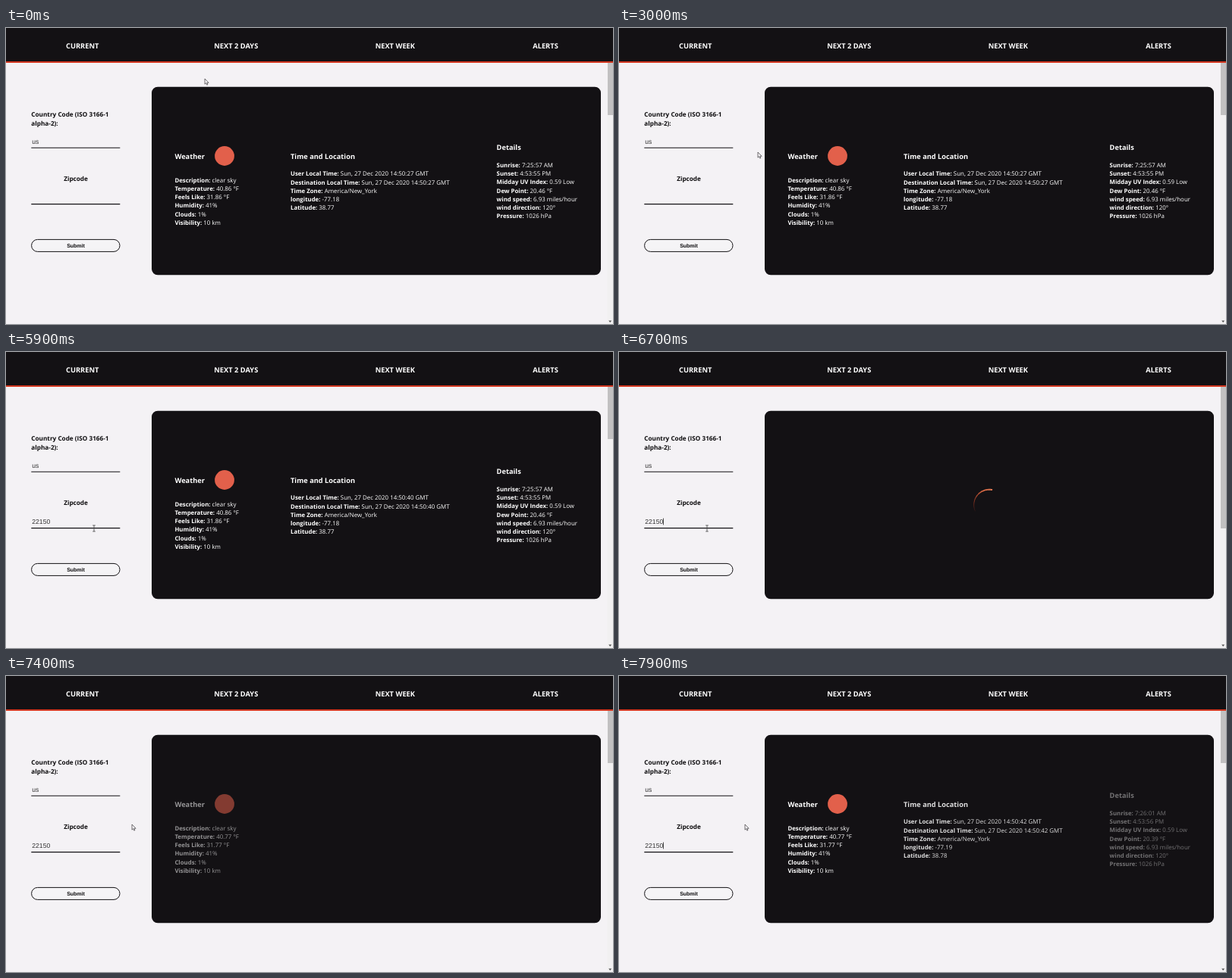
Recreate the animation shown at these times as an HTML page. Size 800 px wide and 391 px high, loop 8000 ms.

```html
<!DOCTYPE html>
<html lang="en">
<head>
<meta charset="utf-8">
<title>Weather dashboard</title>
<style>
html, body { margin: 0; width: 100%; height: 100%; overflow: hidden; background: #f4f2f5; }
svg { display: block; width: 100vw; height: 100vh; font-family: "Open Sans", "Noto Sans", sans-serif; text-rendering: geometricPrecision; }
.nav { font-size: 9.3px; font-weight: 700; fill: #fff; text-anchor: middle; }
.label { font-size: 8.2px; font-weight: 700; fill: #0c0b0d; }
.input { font: 8.6px "Liberation Sans", Arial, sans-serif; fill: #333; }
.submit { font: 700 7px "Liberation Sans", Arial, sans-serif; fill: #0c0b0d; text-anchor: middle; }
.card { font-size: 7.92px; fill: #fff; }
.card .title { font-size: 9.25px; font-weight: 700; }
.card .key { font-size: 7.82px; font-weight: 700; }
</style>
</head>
<body>
<svg viewBox="0 0 800 391">
  <rect width="800" height="391" fill="#f4f2f5"/>
  <rect x="792.5" y="46" width="7.5" height="345" fill="#f1f0f1"/>
  <rect id="thumb" x="793" y="45" width="7" height="70" fill="#c1c0c1"/>
  <path d="M794.2 386.5h4l-2 2.4z" fill="#505050"/>
  <rect width="800" height="44" fill="#131114"/>
  <rect y="44" width="800" height="2" fill="#d2361f"/>
  <g class="nav">
    <text x="100.7" y="27.3">CURRENT</text>
    <text x="303.3" y="27.3">NEXT 2 DAYS</text>
    <text x="512.8" y="27.3">NEXT WEEK</text>
    <text x="711" y="27.3">ALERTS</text>
  </g>

  <g class="label">
    <text x="33.3" y="117.4">Country Code (ISO 3166-1</text>
    <text x="33.3" y="128.7">alpha-2):</text>
    <text x="92" y="202.3" text-anchor="middle">Zipcode</text>
  </g>
  <text class="input" x="34.3" y="153">us</text>
  <text class="input" id="zip" x="34.3" y="227"></text>
  <path d="M33.3 158.3h117M33.3 232.6h117" stroke="#131114" stroke-width="1.1"/>
  <rect id="caret" y="219.6" width=".8" height="8.8" fill="#222"/>
  <rect x="33.6" y="279.4" width="116.4" height="16" rx="8" fill="#f5f4f6" stroke="#131114" stroke-width="1"/>
  <text class="submit" x="92" y="289.6">Submit</text>

  <rect x="192" y="77.7" width="592" height="248.6" rx="8" fill="#131114"/>
  <g class="card" id="card"></g>
  <g id="spinner" fill="none"></g>

  <path id="arrow" d="M0 0V7.2L1.7 5.7 2.8 8.2 3.9 7.7 2.9 5.3H5.1Z" fill="#f4f2f5" stroke="#3a383c" stroke-width=".7"/>
  <path id="ibeam" d="M-1.8 0H1.8M0 0V8M-1.8 8H1.8" fill="none" stroke="#444" stroke-width=".8"/>
</svg>
<script>
const LOOP = 8000, TICK = 100;
const LOAD_START = 6100, LOAD_END = 7000;
const FADE = 500, FADE_STARTS = [7130, 7470, 7700];
const DIGIT = 4.78;

const $ = id => document.getElementById(id);
const show = (el, on) => el.setAttribute('visibility', on ? 'visible' : 'hidden');
const clamp = v => Math.max(0, Math.min(1, v));
const within = (t, spans) => spans.some(([a, b]) => t >= a && t < b);
const latest = (t, steps) => steps.reduce((value, [at, next]) => t >= at ? next : value, '');

// time, x, y
const cursorPath = [
  [0, 262, 67], [100, 262, 67], [500, 281.5, 62], [800, 281.5, 62], [900, 288, 62],
  [1000, 288, 62], [1100, 324, 47], [2400, 324, 47], [3000, 183, 164],
  [3300, 116, 230], [3400, 116, 229], [6900, 116, 229], [7300, 166, 196], [LOOP, 166, 196]
];
const zipSteps = [[4400, '2'], [4600, '22'], [5000, '2215'], [5400, '22150']];
const caretSpans = [[3600, 4000], [4400, 5900], [6400, 6900], [7500, LOOP]];
const clockSteps = [[0, '27'], [4400, '39'], [5000, '40'], [LOAD_START, '42']];

function cursorAt(t) {
  const i = cursorPath.findIndex(p => p[0] > t);
  const [t0, x0, y0] = cursorPath[i - 1], [t1, x1, y1] = cursorPath[i];
  const k = (t - t0) / (t1 - t0);
  return [x0 + (x1 - x0) * k, y0 + (y1 - y0) * k];
}

function column(x, y, title, rows, opacity) {
  const lines = rows.map(([key, value], i) =>
    `<text x="${x}" y="${y + 31.3 + i * 11.2}"><tspan class="key">${key}:</tspan> ${value}</text>`);
  return `<g opacity="${opacity}"><text class="title" x="${x}" y="${y}">${title}</text>${lines.join('')}` +
    (title === 'Weather' ? '<circle cx="288" cy="169" r="12.9" fill="#e2604b"/>' : '') + '</g>';
}

function card(t) {
  const fresh = t >= LOAD_START;
  const pick = (before, after) => fresh ? after : before;
  const opacity = i => fresh ? clamp((t - FADE_STARTS[i]) / FADE) : 1;
  const now = `Sun, 27 Dec 2020 14:50:${latest(t, clockSteps)} GMT`;
  return column(222.4, 172.5, 'Weather', [
    ['Description', 'clear sky'],
    ['Temperature', pick('40.86', '40.77') + ' °F'],
    ['Feels Like', pick('31.86', '31.77') + ' °F'],
    ['Humidity', '41%'],
    ['Clouds', '1%'],
    ['Visibility', '10 km']
  ], opacity(0)) + column(375, 172.5, 'Time and Location', [
    ['User Local Time', now],
    ['Destination Local Time', now],
    ['Time Zone', 'America/New_York'],
    ['longitude', pick('-77.18', '-77.19')],
    ['Latitude', pick('38.77', '38.78')]
  ], opacity(1)).replace(/y="([\d.]+)"><tspan/g, (m, y) => `y="${y - 8.5}"><tspan`) +
  column(646.6, 161.2, 'Details', [
    ['Sunrise', pick('7:25:57', '7:26:01') + ' AM'],
    ['Sunset', pick('4:53:55', '4:53:56') + ' PM'],
    ['Midday UV Index', '0.59 Low'],
    ['Dew Point', pick('20.46', '20.39') + ' °F'],
    ['wind speed', '6.93 miles/hour'],
    ['wind direction', '120°'],
    ['Pressure', '1026 hPa']
  ], opacity(2)).replace(/y="([\d.]+)"><tspan/g, (m, y) => `y="${y - 8.5}"><tspan`);
}

// A tapered arc whose head sits at angle 0
function buildSpinner() {
  const parts = 20, span = 125, r = 20.3;
  const point = deg => {
    const a = deg * Math.PI / 180;
    return `${r * Math.cos(a)} ${r * Math.sin(a)}`;
  };
  let out = '';
  for (let i = 0; i < parts; i++) {
    const k = (i + 1) / parts, from = -span * (1 - i / parts);
    out += `<path d="M${point(from)}A${r} ${r} 0 0 1 ${point(from + span / parts + .4)}"
      stroke="hsl(${10 + 6 * k} 75% ${50 + 12 * k}%)" stroke-width="${.5 + 1.5 * k}" opacity="${Math.min(1, .15 + k * 1.1)}"/>`;
  }
  $('spinner').innerHTML = out;
}

function render(t) {
  const loading = t >= LOAD_START && t < LOAD_END;
  $('card').innerHTML = card(t);
  $('thumb').setAttribute('height', loading ? 188 : 70);

  show($('spinner'), loading);
  $('spinner').setAttribute('transform', `translate(488 202) rotate(${281 + (t - 6700) * .36})`);

  const zip = latest(t, zipSteps);
  $('zip').textContent = zip;
  $('caret').setAttribute('x', 34.2 + zip.length * DIGIT);
  show($('caret'), within(t, caretSpans));

  const [x, y] = cursorAt(t);
  const overInput = x > 33 && x < 150 && y > 214 && y < 234;
  show($('arrow'), !overInput);
  show($('ibeam'), overInput);
  $(overInput ? 'ibeam' : 'arrow').setAttribute('transform', `translate(${x} ${y})`);
}

let start, shown = -1;
function loop(now) {
  start ??= now;
  const t = Math.floor((now - start) % LOOP / TICK) * TICK;
  if (t !== shown) render(shown = t);
  requestAnimationFrame(loop);
}

buildSpinner();
render(0);
requestAnimationFrame(loop);
</script>
</body>
</html>
```
